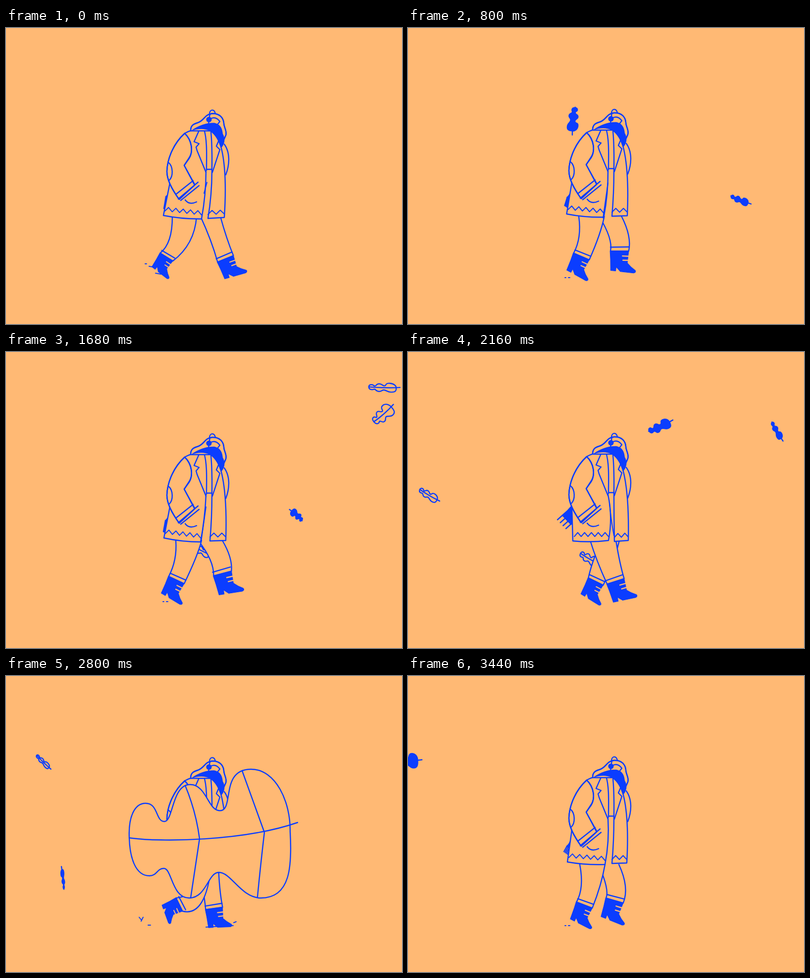
An HTML page that plays this animation: 800 px wide and 600 px high, repeating every 3520 ms.

```html
<!DOCTYPE html>
<html lang="en">
<head>
<meta charset="utf-8">
<title>Autumn walk</title>
<style>
  html, body { margin: 0; width: 100%; height: 100%; overflow: hidden; background: #ffb974; }
  svg { display: block; width: 100vw; height: 100vh; }
</style>
</head>
<body>
<svg viewBox="0 0 800 600">
  <rect width="800" height="600" fill="#ffb974"/>
  <g id="scene" stroke-linecap="round" stroke-linejoin="round" stroke-width="2.4"></g>
</svg>
<script>
const BLUE = '#0b3dff', SAND = '#ffb974';
const STEP = 80, FRAMES = 44, CYCLE = 43;
const scene = document.getElementById('scene');

// Walk poses, placed at q on a cycle of 43 units.
// hem: back corner, slit left, slit right, front corner
// tail: scarf end edge (two points) and fringe direction
// legs: boot x, y, angle, scale; then hip x and a mid point for each side
const poses = [
  { q: 0, dy: 2.5,
    hem: [318, 380, 395, 387, 408, 386, 441, 384],
    tail: [323, 342, 328, 338, -4, 24],
    near: [324, 464, 38, .77, 336, 330, 428, 385, 371, 433],
    far: [443, 468, -16, .88, 393, 413, 430, 433, 446, 425],
    extra: 'M281 478h3M289 483l11 2M302 497l11 2M406 313L400 335' },
  { q: 11, dy: 1.5,
    hem: [331, 384, 404, 384, 416, 384, 444, 383],
    tail: [311, 341, 329, 347, -4, 13],
    near: [350, 463, 70, .76, 362, 375, 430, 415, 395, 459],
    far: [420, 471, -2, .88, 385, 397, 430, 429, 432, 430],
    extra: 'M269 489l4 5M277 489l-4 8M287 505h5M460 500l5-2M404 509L459 506' },
  { q: 13, dy: 0,
    hem: [330, 384, 405, 383, 416, 383, 444, 383],
    tail: [311, 341, 329, 347, -4, 13],
    near: [396, 461, 18, .83, 362, 381, 423, 421, 420, 432],
    far: [392, 470, 1, .9, 385, 395, 425, 421, 418, 425],
    extra: 'M261 504l9 1M266 504l5-2M468 499l5 2M407 312Q410 340 416 380M371 509H430' },
  { q: 22, dy: 1,
    hem: [333, 383, 405, 382, 417, 384, 445, 382],
    tail: [312, 331, 329, 349, -10, 9],
    near: [419, 465, -12, .92, 368, 383, 425, 420, 428, 425],
    far: [379, 465, 32, .85, 390, 374, 424, 427, 413, 430],
    extra: 'M407 306Q410 340 416 372' },
  { q: 28, dy: 0,
    hem: [329, 386, 404, 383, 415, 383, 444, 380],
    tail: [315, 340, 319, 362, -10, 2],
    near: [390, 465, 0, 1.02, 357, 365, 425, 406, 408, 420],
    far: [364, 456, 50, .9, 385, 380, 415, 425, 416, 438],
    extra: 'M329 499h8M330 504h3' },
  { q: 39, dy: 0,
    hem: [322, 377, 398, 382, 412, 380, 442, 379],
    tail: [321, 345, 328, 350, -6, 11],
    near: [356, 464, 27, .87, 347, 350, 425, 398, 388, 425],
    far: [417, 455, 22, .92, 385, 400, 425, 426, 439, 425],
    extra: 'M317 506h2M324 506h3' },
  { q: 41, dy: 2,
    hem: [319, 377, 393, 385, 412, 383, 444, 382],
    tail: [322, 342, 327, 345, -4, 22],
    near: [344, 462, 31, .88, 343, 341, 420, 395, 383, 418],
    far: [437, 449, -9, .95, 388, 412, 420, 437, 452, 415],
    extra: 'M317 506h2M324 506h3M404 314L394 385' }
];

// Leaf keys: frame, x, y, scale, squash, angle, solid
const backLeaves = [
  [[5, 840, 290, .14, .7, 20, 1], [7, 774, 319, .145, .65, -5, 1], [14, 533, 388, .09, .35, 63, 1],
   [21, 396, 403, .11, .6, 30, 0], [27, 42, 290, .125, .5, 33, 0], [29, -50, 270, .12, .5, 20, 0]],
  [[12, 830, 300, .12, .6, 0, 0], [14, 724, 319, .112, .5, 35, 0], [21, 587, 331, .092, .7, 225, 1],
   [27, 366, 419, .12, .6, 393, 0], [35, 115, 411, .125, .25, 265, 1], [39, -40, 390, .12, .6, 200, 1]],
  [[19, 840, 60, .17, .5, -20, 0], [21, 762, 72, .17, .4, 3, 0], [27, 509, 151, .145, .6, -22, 1],
   [35, 75, 174, .108, .35, 46, 0], [37, -40, 180, .11, .6, 20, 0]],
  [[36, 430, 260, .14, .5, -80, 1], [43, -4, 172, .16, .75, 2, 1], [44, -60, 172, .16, .75, 2, 1]]
];
const frontLeaves = [
  [[1, 840, 150, .15, .6, 320, 1], [7, 413, 188, .15, .5, 197, 1], [14, 229, 184, .155, .7, -32, 1],
   [20, 36, 200, .15, .6, -120, 1]],
  [[20, 815, 125, .14, .8, -70, 0], [21, 762, 126, .142, .75, -38, 0], [27, 745, 160, .12, .45, 62, 1],
   [28, 715, 172, .15, .6, 50, 0], [35, 420, 325, 1, 1, 0, 0], [42, -100, 200, 1.3, 1, 0, 0],
   [43, -280, 150, 1.3, 1, 0, 0]]
];

const LEAF = 'M-171 3C-173-40-160-67-138-67C-112-67-118-30-100-30C-82-30-85-105-48-105' +
  'C-15-105-12-52 12-52C42-52 12-136 75-136C125-136 155-70 154-10C158 60 155 125 95 125' +
  'C55 125 35 73 10 73C-12 73-15 125-50 125C-85 125-85 65-101 65C-115 65-115 80-130 80C-160 80-170 40-171 3Z';
const VEINS = 'M57-133L102-8Q94 60 88 123M-58-103Q-36-50-29 5L-47 125';

const mix = (a, b, u) => a + (b - a) * u;
const mixAll = (a, b, u) => a.map((v, i) => mix(v, b[i], u));
const line = (d, more = '') => `<path d="${d}" fill="none" stroke="${BLUE}" ${more}/>`;
const shape = (d, more = '') => `<path d="${d}" fill="${SAND}" stroke="${BLUE}" ${more}/>`;
const solid = (d, more = '') => `<path d="${d}" fill="${BLUE}" ${more}/>`;

function poseAt(q) {
  const n = poses.findLastIndex(p => p.q <= q);
  const a = poses[n], b = poses[(n + 1) % poses.length];
  const u = (q - a.q) / ((b.q || CYCLE) - a.q);
  const pose = { dy: mix(a.dy, b.dy, u), extra: (u < .5 ? a : b).extra };
  for (const k of ['hem', 'tail', 'near', 'far']) pose[k] = mixAll(a[k], b[k], u);
  return pose;
}

// Quadratic segment from a to b that passes through m halfway.
const bend = (a, m, b) => `Q${2 * m[0] - (a[0] + b[0]) / 2} ${2 * m[1] - (a[1] + b[1]) / 2} ${b[0]} ${b[1]}`;

function leg([x, y, angle, s, hipL, lx, ly, hipR, rx, ry]) {
  const c = Math.cos(angle * Math.PI / 180) * s, n = Math.sin(angle * Math.PI / 180) * s;
  const at = (px, py) => [x + px * c - py * n, y + px * n + py * c];
  const topL = at(-19, 2), topR = at(20, -2), a = [hipL, 382], b = [hipR, 382];
  return shape(`M${a}${bend(a, [lx, ly], topL)}L${topR}${bend(topR, [rx, ry], b)}`) +
    line(`M${at(-20, -6)}L${at(19, -11)}`) +
    `<g transform="translate(${x} ${y}) rotate(${angle}) scale(${s})">` +
    solid('M-20 2L20-2V24Q28 32 39 38Q42 42 36 44H7L-3 35V44H-14L-17 20Z', `stroke="${BLUE}" stroke-width="1.2"`) +
    `<path d="M8 10L22 9M10 19L22 18" stroke="${SAND}" stroke-width="2.6"/></g>`;
}

function scarfTail([ax, ay, bx, by, vx, vy]) {
  let d = '';
  for (let k = 0; k < 4; k++) {
    const x = mix(ax, bx, k / 3), y = mix(ay, by, k / 3);
    d += `M${x} ${y}l${vx} ${vy}`;
  }
  return solid(`M331 312Q${ax + 11} ${ay - 9} ${ax} ${ay}L${bx} ${by}L341 346Z`, `stroke="${BLUE}"`) + line(d);
}

function zigzag(x0, y0, x1, y1, count) {
  let d = '';
  for (let k = 0; k <= count; k++) {
    d += `${k ? 'L' : 'M'}${mix(x0, x1, k / count)} ${mix(y0, y1, k / count) + (k % 2 ? -4 : 4)}`;
  }
  return line(d, 'stroke-width="2"');
}

function coat(hem, dy) {
  const [ax, ay, bx, by, cx, cy, ex, ey] = hem.map((v, i) => i % 2 ? v - dy : v);
  const hemLine = `${ax} ${ay}Q${mix(ax, bx, .5)} ${mix(ay, by, .5) + 4} ${bx} ${by}`;
  return `<path fill="${SAND}" d="M378 204Q338 222 328 270Q324 295 331 312L${hemLine}L405 290L416 287` +
    `L${cx} ${cy}L${ex} ${ey}Q445 300 437 238L414 205Z"/>` +
    line(`M331 312L${hemLine}Q${bx + 9} 335 404 288`) +
    line(`M416 287Q416 335 ${cx} ${cy}L${ex} ${ey}Q447 290 435 241`) +
    zigzag(ax + 3, ay - 13, bx, by - 12, 10) + zigzag(cx, cy - 12, ex, ey - 11, 4) +
    line('M441 233C453 250 452 274 444 295') +
    shape('M361 211C375 225 379 248 370 262L360 276L381 316L350 345C335 325 325 305 325 288C326 262 338 232 361 211Z',
      'stroke="none"') +
    line('M349 344C335 323 325 305 325 288C326 258 342 228 361 211Q375 203 392 202') +
    line('M361 211C376 225 379 248 369 262L360 276L381 314') +
    line('M328 270C338 278 338 298 330 306') +
    line('M344 334L378 307M348 344L388 310M353 347L390 317M362 346Q370 357 385 350') +
    line('M391 203L380 228L390 232L384 239L386 246L404 290') +
    line('M400 203C407 225 405 260 405 286M414 208C417 240 416 260 416 287M405 284H416') +
    line('M430 225L425 237L432 244L417 290');
}

function head() {
  return shape('M411 173C411 161 422 161 423 172') +
    shape('M373 206C373 195 379 192 386 190C401 186 400 173 416 171C432 170 439 180 440 190' +
      'C440 199 447 206 444 215L440 224L420 206Z', 'stroke="none"') +
    line('M373 205C373 195 379 192 386 190C401 186 400 173 416 171C432 170 439 180 440 190C440 199 447 206 444 215L441 222') +
    line('M412 172L410 183L409 194M414 181Q424 176 432 187L428 192') +
    `<circle cx="410" cy="183" r="5.6" fill="${BLUE}"/>` +
    solid('M374 206C390 193 410 189 422 190C434 193 437 202 438 212C444 222 442 233 434 242' +
      'C430 228 424 214 411 206C400 200 386 202 374 206Z');
}

function leaf(keys, i) {
  const n = keys.findLastIndex(k => k[0] <= i);
  if (n < 0 || i > keys.at(-1)[0]) return '';
  const a = keys[n], b = keys[n + 1] || a;
  const u = a === b ? 0 : (i - a[0]) / (b[0] - a[0]);
  const [, x, y, , squash, angle] = mixAll(a, b, u);
  const s = a[3] * (b[3] / a[3]) ** u;
  const full = (u < .5 ? a : b)[6];
  const thin = 'vector-effect="non-scaling-stroke"';
  const rib = `M-171 3C-110 12 60 10 ${s < .3 ? 200 : 169}-28`;
  return `<g transform="translate(${x} ${y}) rotate(${angle}) scale(${s} ${s * squash})">` +
    (full ? solid(LEAF) : shape(LEAF, thin)) + line(rib, thin) +
    (s > .3 ? line(VEINS, thin) : '') + '</g>';
}

function draw(i) {
  // The walker rests for the last step of the loop.
  const pose = poseAt(Math.min(i, FRAMES - 2) * 4 % CYCLE);
  scene.innerHTML =
    backLeaves.map(k => leaf(k, i)).join('') +
    scarfTail(pose.tail) + leg(pose.far) + leg(pose.near) +
    `<g transform="translate(0 ${pose.dy})">${coat(pose.hem, pose.dy)}${head()}</g>` +
    line(pose.extra, 'stroke-width="2"') +
    frontLeaves.map(k => leaf(k, i)).join('');
}

const start = performance.now();
let shown = -1;
function tick() {
  const i = Math.floor((performance.now() - start) / STEP) % FRAMES;
  if (i !== shown) draw(shown = i);
  requestAnimationFrame(tick);
}
tick();
</script>
</body>
</html>
```
